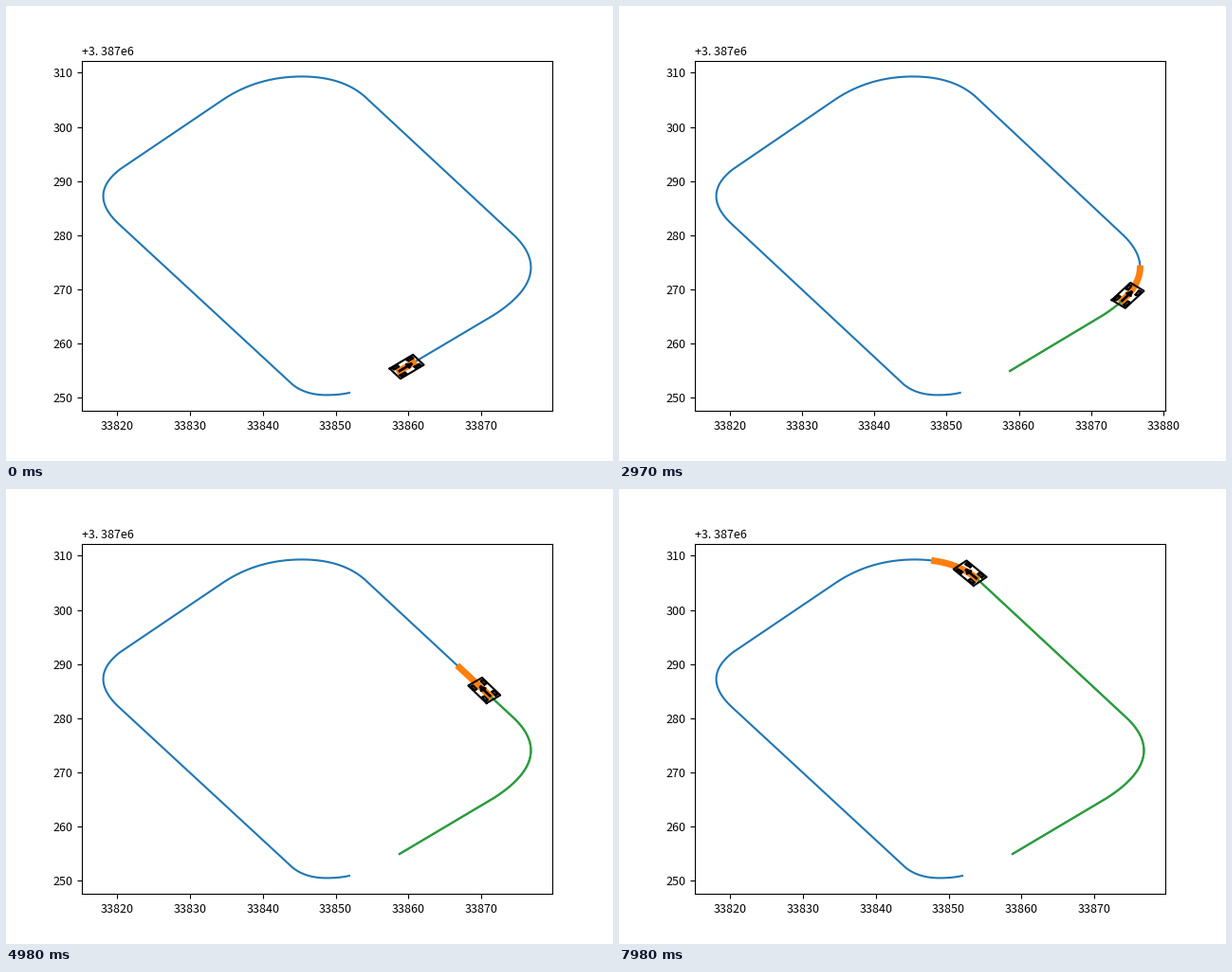
These frames come from a looping animation (640x480 px, 8000 ms). A matplotlib script:

```python
import numpy as np
import matplotlib.pyplot as plt
from matplotlib.animation import FuncAnimation
from matplotlib.ticker import FormatStrFormatter, MultipleLocator

plt.rcParams["font.family"] = "Noto Sans CJK JP"
plt.rcParams["font.size"] = 9

# Car geometry in metres, measured from the rear axle
FRONT, BACK, WIDTH = 3.3, 0.8, 2.4
BASE, TRACK = 2.5, 0.7 * 2.4
TYRE_R, TYRE_W = 0.44, 0.7

CRUISE, RISE = 0.278, 39.5    # metres per step, steps to gain speed
FRAMES, INTERVAL, STEP = 400, 20, 30

# The course is straight between bends: entry, control point, exit (pixels)
START = (415, 385)
BENDS = [
    ((512, 327.5), (580.5, 285), (536, 242.1)),
    ((380, 97), (355.7, 74.4), (312, 74.4)),
    ((312, 74.4), (266, 74.4), (230, 98)),
    ((121, 171.6), (84.5, 199), (120, 231)),
    ((300, 397.5), (314, 410.4), (338, 410.4)),
    ((338, 410.4), (352, 410.4), (362, 408)),
]


def to_data(pts):
    x, y = np.asarray(pts, float).T
    return np.column_stack([33820 + (x - 116.9) / 7.69, 250 + (413.4 - y) / 5.717])


def bezier(a, b, c):
    t = np.linspace(0, 1, 80)[:, None]
    return (1 - t) ** 2 * a + 2 * t * (1 - t) * b + t * t * c


course = np.vstack([to_data([START])] + [bezier(*to_data(b)) for b in BENDS])
steps = np.hypot(*np.diff(course, axis=0).T)
course = course[np.r_[True, steps > 1e-9]]
arc = np.r_[0, np.cumsum(steps[steps > 1e-9])]
angle = np.unwrap(np.arctan2(*np.diff(course, axis=0).T[::-1]))
mids = (arc[1:] + arc[:-1]) / 2


def point(s):
    return np.array([np.interp(s, arc, course[:, 0]),
                     np.interp(s, arc, course[:, 1])])


def heading(s):
    return np.interp(s, mids, angle)


def stretch(a, b):
    return point(np.linspace(a, b, 300))


def travel(n):
    """Distance after n steps; the speed follows tanh up to cruising."""
    return CRUISE * RISE * np.log(np.cosh((n + 1) / RISE))


def horizon(n):
    return 6.67 - 4.27 * np.exp(-n / 29)


def rotate(shape, a):
    c, s = np.cos(a), np.sin(a)
    return np.array([[c, -s], [s, c]]) @ shape


def box(back, front, half):
    return np.array([[-back, -back, front, front, -back],
                     [half, -half, -half, half, half]])


def car_parts(steer):
    """Outline, four wheels and the arrow (shaft and two barbs)."""
    tyre = box(TYRE_R, TYRE_R, TYRE_W / 4)
    parts = [box(BACK, FRONT, WIDTH / 2)]
    for x, turn in ((BASE, steer), (0, 0)):
        for y in (-TRACK / 2, TRACK / 2):
            parts.append(rotate(tyre, turn) + [[x], [y]])
    tip = 0.8 * BASE
    parts.append(np.array([[0, tip], [0, 0]]))
    for side in (-1, 1):
        a = np.pi + side * np.pi / 6
        parts.append(np.array([[tip, tip + 0.3 * tip * np.cos(a)],
                               [0, 0.3 * tip * np.sin(a)]]))
    return parts


fig, ax = plt.subplots(figsize=(6.4, 4.8), dpi=100)
ax.set_position([0.125, 0.11, 0.775, 0.77])
ax.plot(*course.T, color="C0")
plan, = ax.plot([], [], color="C1", lw=5)
trail, = ax.plot([], [], color="C2")
car = [ax.plot([], [], color="black", lw=1.5 if k < 5 else 2)[0] for k in range(8)]

for axis in (ax.xaxis, ax.yaxis):
    axis.set_major_locator(MultipleLocator(10))
    axis.set_major_formatter(FormatStrFormatter("%d"))
fig.text(80 / 640, 1 - 52.5 / 480, "+3. 387e6")


def draw(i):
    n = (i * INTERVAL + STEP // 3) // STEP
    s = travel(n)
    plan.set_data(*stretch(s, s + horizon(n)))
    trail.set_data(*stretch(0, s))

    turn = (heading(s + 1) - heading(s - 1)) / 2
    pos, yaw = point(s)[:, None], heading(s)
    for line, part in zip(car, car_parts(np.arctan(BASE * turn))):
        line.set_data(*(rotate(part, yaw) + pos))

    # The view widens while the car reaches past the course
    ax.relim()
    ax.autoscale_view()
    return [plan, trail, *car]


anim = FuncAnimation(fig, draw, frames=FRAMES, interval=INTERVAL,
                     repeat=True, repeat_delay=0, blit=False,
                     cache_frame_data=False)
plt.show()
```
